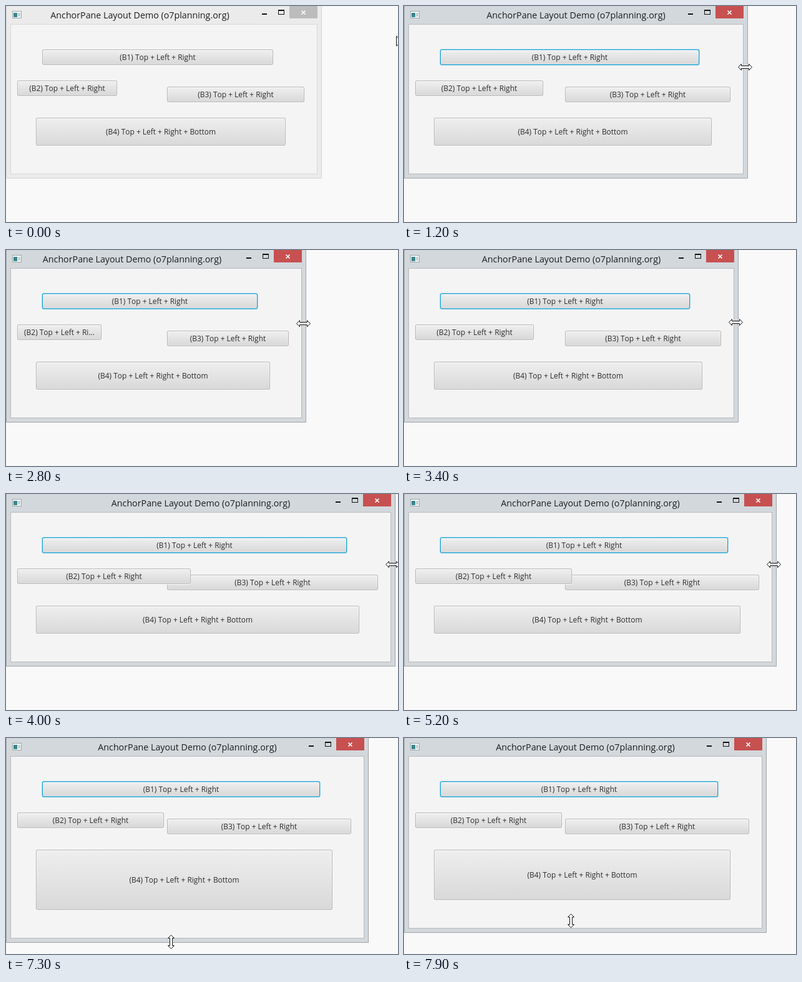
These frames come from a looping animation (628x348 px, 8000 ms). An HTML page:

```html
<!DOCTYPE html>
<html lang="en">
<head>
<meta charset="utf-8">
<title>AnchorPane Layout Demo</title>
<style>
  html, body { margin: 0; width: 100%; height: 100%; overflow: hidden; background: #f9f9f9; }
  svg { display: block; }
  text { font-family: "Open Sans", "Noto Sans", sans-serif; text-anchor: middle; font-kerning: none; }
  .label { font-size: 11.93px; fill: #2b2b2b; }
  .title { font-size: 14.25px; fill: #1c1c1c; }
</style>
</head>
<body>
<svg width="628" height="348" viewBox="0 0 628 348">
  <defs>
    <linearGradient id="rim" x2="0" y2="1">
      <stop stop-color="#fbfbfb"/><stop offset="1" stop-color="#dedede"/>
    </linearGradient>
    <linearGradient id="body" x2="0" y2="1">
      <stop stop-color="#eeeeee"/><stop offset="1" stop-color="#d9d9d9"/>
    </linearGradient>
  </defs>
  <g id="scene"></g>
</svg>
<script>
const LOOP = 8000, STEP = 100;
const GRAB_SIDE = 900, LEAVE_SIDE = 5400, GRAB_BOTTOM = 6900;

const scene = document.getElementById("scene");

// Each move is [start, end, destination, power]; a higher power brakes harder.
function glide(t, from, ...moves) {
  return moves.reduce((value, [start, end, to, power]) => {
    const progress = Math.min(1, Math.max(0, (t - start) / (end - start)));
    return value + (to - value) * (1 - (1 - progress) ** power);
  }, from);
}

const windowWidth = t => Math.round(glide(t, 506,
  [GRAB_SIDE, 2200, 617, 2], [2300, 3200, 479, 5], [3200, 4400, 634, 2.5], [4700, 5500, 581, 1.2]));

const windowHeight = t => Math.round(glide(t, 278, [GRAB_BOTTOM, 7600, 346, 1.7], [7700, 8000, 298, 1]));

function pointerAt(t, W, H) {
  if (t < GRAB_SIDE) return {
    kind: t < 600 ? "arrow" : "horizontal",
    x: glide(t, 625, [0, 800, 501, 4]),
    y: glide(t, 48, [0, 800, 97, 4])
  };
  if (t <= LEAVE_SIDE) return {
    kind: "horizontal",
    x: W - 5,
    y: glide(t, 97, [GRAB_SIDE, 2800, 118, 0.37], [3200, 4000, 113, 1])
  };
  if (t < GRAB_BOTTOM) return {
    kind: t < 6600 ? "arrow" : "vertical",
    x: glide(t, 576, [LEAVE_SIDE, 6000, 240, 2.7], [6000, 6600, 258, 1]),
    y: glide(t, 113, [LEAVE_SIDE, 6000, 308, 2.7], [6000, 6600, 275, 1])
  };
  // The pointer runs ahead of the window edge on the way back up.
  return {
    kind: "vertical",
    x: glide(t, 258, [GRAB_BOTTOM, 7600, 267, 1.7]),
    y: t < 7700 ? H - 2 : glide(t, 344, [7700, 8000, 270, 1])
  };
}

const rect = (x, y, w, h, fill, extra = "") =>
  `<rect x="${x}" y="${y}" width="${w}" height="${h}" fill="${fill}" ${extra}/>`;

const text = (x, y, kind, content) =>
  `<text x="${x}" y="${y}" class="${kind}">${content}</text>`;

function button(left, top, right, bottom, label, focused) {
  const w = right - left, h = bottom - top;
  const layer = (inset, fill, radius, extra = "") =>
    rect(left + inset, top + inset, w - 2 * inset, h - 2 * inset, fill, `rx="${radius}" ${extra}`);
  const edge = focused
    ? layer(-1, "#039ed3", 4, 'opacity=".3"') + layer(0, "#0f9fd4", 3)
    : rect(left, top + 1, w, h, "#fbfbfb", 'rx="3"') + layer(0, "#b6b6b6", 3);
  return edge + layer(1, "url(#rim)", 2) + layer(2, "url(#body)", 1) +
    text((left + right) / 2, Math.round((top + bottom) / 2 + 4.4), "label", label);
}

function titleBar(W, active) {
  // A long title centres in the space left of the window controls.
  const centre = W < 520 ? (W - 77) / 2 : W / 2;
  return rect(10.5, 8.5, 14, 11, "#f7f9f9", 'stroke="#9ba3a6"') +
    rect(12, 11, 6, 7, "#36858d") + rect(19, 11, 4, 6, "#c3d0d3") +
    text(centre, 20, "title", "AnchorPane Layout Demo (o7planning.org)") +
    rect(W - 96, 12, 8, 2, "#111") +
    rect(W - 69.5, 6.5, 9, 7, "none", 'stroke="#111"') + rect(W - 70, 6, 10, 2, "#111") +
    rect(W - 52, 0, 45, 20, active ? "#c75050" : "#bcbcbc") +
    `<path d="M${W - 32.5} 7.5l6 6m0-6l-6 6" stroke="#fff" stroke-width="1.7"/>`;
}

function pointer({ kind, x, y }) {
  const arrow = kind === "arrow";
  const shape = arrow
    ? "M.5.5V16.5L4.2 13L6.8 18.6L9.2 17.6L6.7 12H11.7Z"
    : "M-11 0L-6-5V-2H6V-5L11 0L6 5V2H-6V5Z";
  const snap = v => Math.floor(v) + (arrow ? 0 : 0.5);
  const turn = kind === "vertical" ? " rotate(90)" : "";
  return `<path d="${shape}" transform="translate(${snap(x)} ${snap(y)})${turn}" fill="#fff" stroke="#111"/>`;
}

function draw(t) {
  const W = windowWidth(t), H = windowHeight(t);
  const active = t > GRAB_SIDE;
  const anchors = "Top + Left + Right";
  const shortLabel = W < 484 ? "Top + Left + Ri..." : anchors;
  scene.innerHTML =
    rect(0, 0, W, H, active ? "#d3d8dc" : "#ebebeb") +
    `<path d="M.5 0V${H - 0.5}H${W - 0.5}V0" fill="none" stroke="${active ? "#9fa5a9" : "#d5d5d5"}"/>` +
    rect(7.5, 29.5, W - 15, H - 37, "#f4f4f4", `stroke="${active ? "#b4babe" : "#d8d8d8"}"`) +
    titleBar(W, active) +
    button(58, 70, W - 78, 95, `(B1) ${anchors}`, active) +
    button(258, 130, W - 28, 155, `(B3) ${anchors}`) +
    button(18, 120, W - 328, 145, `(B2) ${shortLabel}`) +
    button(48, 180, W - 58, H - 53, `(B4) ${anchors} + Bottom`) +
    pointer(pointerAt(t, W, H));
}

const start = performance.now();
let shown = -1;

function tick() {
  const elapsed = Math.max(0, performance.now() - start) % LOOP;
  const t = Math.floor(elapsed / STEP) * STEP;
  if (t !== shown) draw(shown = t);
  requestAnimationFrame(tick);
}
tick();
</script>
</body>
</html>
```
